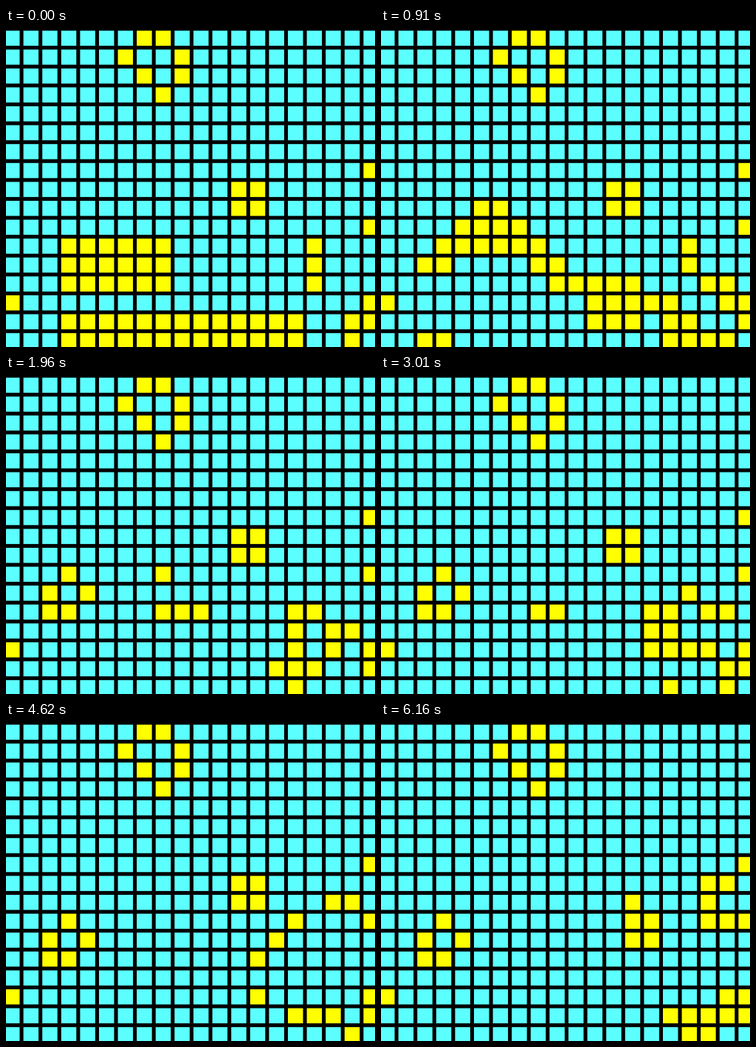
Animation of 500 by 432 pixels, one loop 6300 ms. Source, as an HTML page with a canvas:

```html
<!DOCTYPE html>
<html lang="en">
<head>
<meta charset="utf-8">
<title>Game of Life</title>
<style>
html, body { margin: 0; width: 100%; height: 100%; overflow: hidden; background: #000; }
canvas { display: block; }
</style>
</head>
<body>
<canvas id="stage" width="500" height="432"></canvas>
<script>
const ctx = document.getElementById('stage').getContext('2d');
const SIZE = 20;
const PITCH = 512 / SIZE;
const CELL = PITCH * 0.8;
const LEFT = -2;
const TOP = 3.6 - PITCH; // the first world row lies above the stage
const TICK = 70;
const TICKS = 90;
const LAST = 12;

function rect(grid, x, y, w, h) {
  for (let r = y; r < y + h; r++) grid[r].fill(1, x, x + w);
}

function loaf(grid, x, y) {
  rect(grid, x + 1, y, 2, 1);
  rect(grid, x + 3, y + 1, 1, 2);
  for (let i = 0; i < 3; i++) grid[y + 1 + i][x + i] = 1;
}

function seed() {
  const grid = Array.from({ length: SIZE }, () => Array(SIZE).fill(0));
  loaf(grid, 6, 1);
  rect(grid, 12, 9, 2, 2);
  rect(grid, 3, 12, 6, 3);
  rect(grid, 3, 16, 13, 3);
  rect(grid, 16, 12, 1, 3);
  rect(grid, 18, 16, 1, 2);
  grid[15][0] = 1;
  for (const r of [8, 11, 15, 16, 18]) grid[r][SIZE - 1] = 1;
  return grid;
}

function neighbours(grid, r, c) {
  let sum = -grid[r][c];
  for (let y = r - 1; y <= r + 1; y++) {
    for (let x = c - 1; x <= c + 1; x++) sum += grid[y][x];
  }
  return sum;
}

// Cells on the border of the world never change
function evolve(grid) {
  const inner = i => i > 0 && i < SIZE - 1;
  return grid.map((row, r) => row.map((alive, c) => {
    if (!inner(r) || !inner(c)) return alive;
    const n = neighbours(grid, r, c);
    return n === 3 || (alive && n === 2) ? 1 : 0;
  }));
}

const generations = [seed()];
for (let i = 0; i < LAST; i++) generations.push(evolve(generations[i]));

// Tick at which a generation appears; the last one holds for two ticks
const startTick = n => Math.min(Math.floor(7.55 * n - 1.35), TICKS - 2);

function generationAt(tick) {
  let n = 0;
  while (n < LAST && startTick(n + 1) <= tick) n++;
  return n;
}

function draw(grid) {
  ctx.fillStyle = '#000';
  ctx.fillRect(0, 0, 500, 432);
  grid.forEach((row, r) => row.forEach((alive, c) => {
    ctx.fillStyle = alive ? '#ffff00' : '#5cffff';
    ctx.fillRect(LEFT + c * PITCH, TOP + r * PITCH, CELL, CELL);
  }));
}

function frame() {
  const tick = Math.floor(performance.now() / TICK) % TICKS;
  draw(generations[generationAt(tick)]);
  requestAnimationFrame(frame);
}
frame();
</script>
</body>
</html>
```
